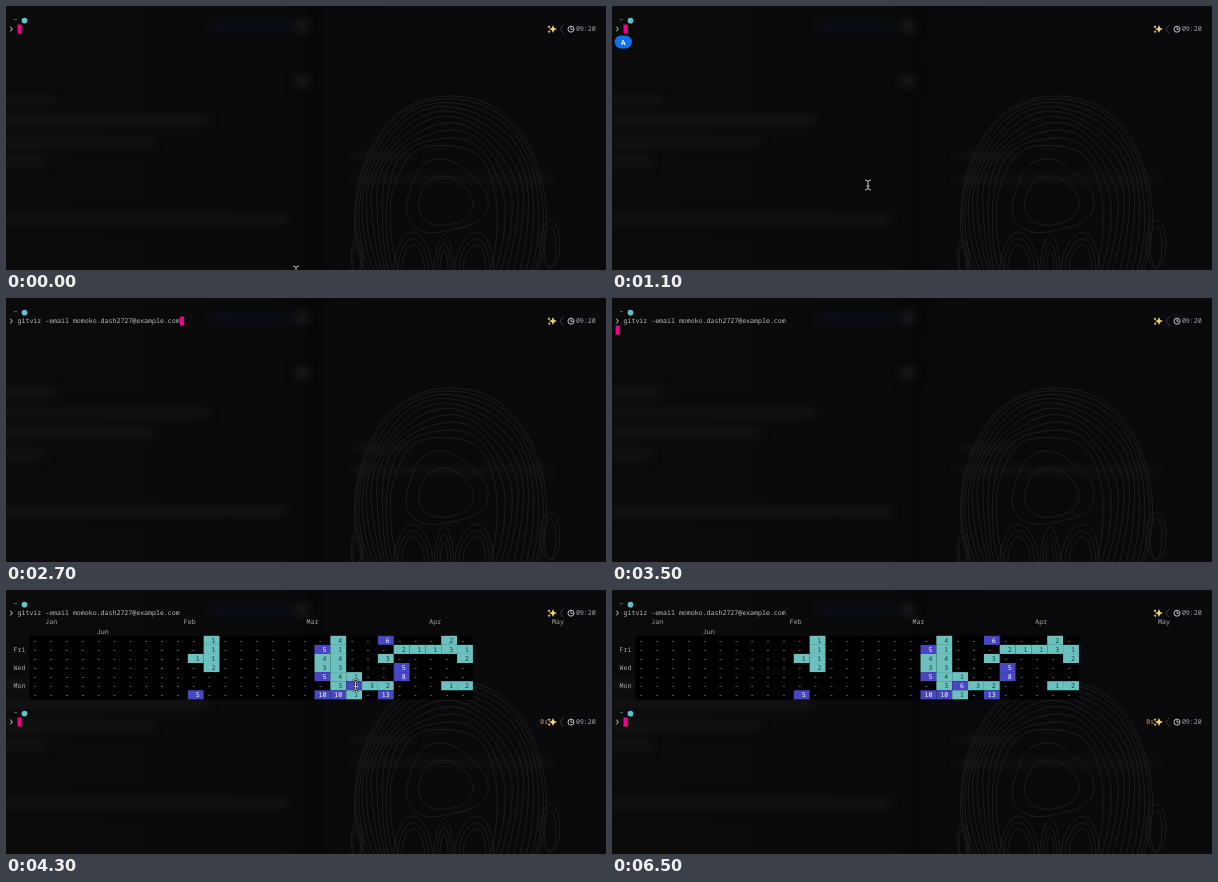
Write an HTML page that moves like this. It is 600x264 px and loops after 6600 ms.

```html
<!DOCTYPE html>
<html lang="en">
<head>
<meta charset="utf-8">
<title>Terminal commit graph</title>
<style>
  html, body { margin: 0; width: 100%; height: 100%; overflow: hidden; background: #0a0a0b; }
  svg { display: block; width: 600px; height: 264px; }
  text {
    font: 6.6px "Noto Sans Mono", "DejaVu Sans Mono", monospace;
    white-space: pre;
    text-rendering: geometricPrecision;
  }
  .line { fill: none; stroke-width: 1; }
</style>
</head>
<body>
<svg id="stage" viewBox="0 0 600 264">
  <defs>
    <filter id="soft" filterUnits="userSpaceOnUse" x="-20" y="-20" width="640" height="304"
      color-interpolation-filters="sRGB"><feGaussianBlur stdDeviation="4"/></filter>
    <linearGradient id="desk">
      <stop offset="0" stop-color="#0b0b0b"/>
      <stop offset=".46" stop-color="#0a0a0a"/>
      <stop offset=".51" stop-color="#070708"/>
      <stop offset=".54" stop-color="#09090b"/>
      <stop offset="1" stop-color="#0a0a0c"/>
    </linearGradient>
  </defs>
  <rect width="600" height="264" fill="url(#desk)"/>
  <g id="blur" filter="url(#soft)"></g>
  <g id="face" class="line" stroke="#222224" style="stroke-width:.8"></g>
  <g id="term"></g>
</svg>
<script>
const LOOP = 6600, STEP = 100;
const CW = 3.96, RH = 9.08, LEFT = 3.6;
const COMMAND = 'gitviz -email momoko.dash2727@example.com';
const $ = id => document.getElementById(id);
const colX = c => LEFT + c * CW;
const rowY = r => 14 + r * RH;
const lerp = (a, b, k) => a + (b - a) * k;
const clamp = v => Math.max(0, Math.min(1, v));

function add(parent, tag, attrs, content) {
  const el = document.createElementNS('http://www.w3.org/2000/svg', tag);
  for (const key in attrs) el.setAttribute(key, attrs[key]);
  if (content !== undefined) el.textContent = content;
  parent.appendChild(el);
  return el;
}
const group = parent => add(parent, 'g', {});
const line = (parent, d, stroke) => add(parent, 'path', { d, stroke, class: 'line' });
const label = (parent, col, row, str, fill, weight = 400) =>
  add(parent, 'text', { x: colX(col), y: rowY(row) + 2.3, fill, 'font-weight': weight }, str);
const show = (el, on) => el.setAttribute('visibility', on ? 'visible' : 'hidden');

// Blurred lines of the windows behind the terminal
const smear = (x, y, width, height = 8, fill = '#151515') =>
  add($('blur'), 'rect', { x, y: y - height / 2, width, height, fill });
[50, 203, 148, 40].forEach((end, i) => smear(-20, 94 + i * 20.5, end + 20));
smear(-20, 213, 300);
smear(205, 20, 80, 12, '#0b0e17');
[20, 75].forEach(y => smear(290, y, 12, 12, '#1b1b1d'));
[150, 173].forEach((y, i) => smear(345, y, 60 + i * 140, 8, '#121212'));

// Contour lines of the head: ellipses with a slow wobble
function contour(cx, cy, rx, up, down, wobble, lobes = 3) {
  let d = '';
  for (let i = 0; i <= 90; i++) {
    const a = i * Math.PI / 45, r = 1 + wobble * Math.cos(lobes * a + cx);
    const y = Math.sin(a);
    d += `${i ? 'L' : 'M'}${(cx + rx * r * Math.cos(a)).toFixed(1)} ${(cy + r * y * (y < 0 ? up : down)).toFixed(1)}`;
  }
  line($('face'), d).removeAttribute('class');
}
for (let i = 0; i < 10; i++) {
  const k = (i / 9) ** 1.3;
  contour(lerp(444.5, 438, k), lerp(208, 196, k), lerp(96, 53, k), lerp(119, 58, k), 130, .008 + .02 * k, 5);
}
contour(439, 196, 27, 25, 24, .05);
contour(439, 192, 40, 36, 36, .1);
for (let i = 0; i < 3; i++) {
  for (const side of [-1, 1]) {
    contour(438 + side * 31, 258, 19 - i * 4, 30 - i * 6, 30, .06);
  }
  contour(438, 264, 10 - i * 3, 34 - i * 8, 20, .04);
}
for (let i = 0; i < 2; i++) {
  contour(544, 236, 10 - i * 4, 21 - i * 6, 26, .03);
  contour(351, 250, 6 - i * 2, 16 - i * 5, 18, .03);
}

const term = $('term');

function prompt(row, took) {
  const g = group(term), y = rowY(row), y2 = rowY(row + 1);
  label(g, 1, row, '~', '#7fb8b4');
  add(g, 'circle', { cx: 18.5, cy: y + .6, r: 2.9, fill: '#5fc3cc' });
  line(g, `M4.3 ${y2 - 2.4}l2 2.4l-2 2.4`, '#c9d3c4');
  if (took) label(g, 134, row + 1, took, '#c79c62');
  const star = (x, cy, r) => {
    const q = r * .3, s = r - q;
    add(g, 'path', { fill: '#f3d27a',
      d: `M${x} ${cy - r}l${q} ${s}l${s} ${q}l${-s} ${q}l${-q} ${s}l${-q} ${-s}l${-s} ${-q}l${s} ${-q}z` });
  };
  star(547, y2, 4);
  star(543, y2 - 2.2, 1.7);
  star(543.2, y2 + 2.6, 1.7);
  line(g, `M557.5 ${y2 - 4.5}l-3.5 4.5l3.5 4.5`, '#3b3b40');
  line(g, `M565 ${y2 - 1.7}v2h1.7`, '#c2c7d0');
  add(g, 'circle', { cx: 565, cy: y2 + .1, r: 3, class: 'line', stroke: '#c2c7d0' });
  label(g, 143, row + 1, '09:20', '#a6aab6');
  return g;
}

prompt(0);
const ghost = label(term, 2, 1, '', '#525252');
const typed = label(term, 2, 1, '', '#bebebe');

// Commits per weekday, one base 36 digit per week; the weeks before are empty
const COMMITS = `
-1-------4--6---2-
-1------51---21131
11------44--3----2
-2------33---5----
--------541--8----
---------3632---12
5-------aa1-d-----`.trim().split('\n');
const WEEKS = 28, CELL = 4 * CW, GREY = '#a9a9a9';
const graph = group(term);
label(graph, 9, 2, 'Jan', GREY);
['Feb', 'Mar', 'Apr', 'May'].forEach((name, i) => label(graph, 44 + i * 31, 2, name, GREY));
label(graph, 22, 3, 'Jun', GREY);
add(graph, 'rect', { x: colX(5), y: rowY(3.5), width: WEEKS * CELL, height: 7 * RH, fill: '#000' });
COMMITS.forEach((days, r) => {
  const row = r + 4;
  if (r % 2) label(graph, 1, row, ['Fri', 'Wed', 'Mon'][r >> 1], GREY);
  [...days.padStart(WEEKS, '-')].forEach((digit, k) => {
    const col = 5 + k * 4, n = parseInt(digit, 36), hot = n >= 5;
    if (!n) return label(graph, col + 1, row, '-', GREY);
    add(graph, 'rect', { x: colX(col), y: rowY(row - .5), width: CELL, height: RH, fill: hot ? '#4747c2' : '#6cc0bd' });
    label(graph, col + (n > 9 ? 1 : 2), row, n, hot ? '#fff' : '#16403f', hot ? 700 : 400);
  });
});

const second = prompt(12, '0s');
const caret = add(term, 'rect', { width: 4.2, height: RH, fill: '#f5008c' });
const under = label(term, 0, 1, '', '#4d0030');

const badge = group(term);
add(badge, 'rect', { x: 2.5, y: 29.5, width: 17.5, height: 13, rx: 6.5, fill: '#1170ee' });
add(badge, 'text', { x: 11.2, y: 38.5, fill: '#fff', 'text-anchor': 'middle',
  style: 'font:700 6.6px Inter,sans-serif' }, 'A');

const mouse = group(term);
const BEAM = 'M-3 -5Q0 -5 0 -3Q0 -5 3 -5M0 -3.5V3.5M-3 5Q0 5 0 3Q0 5 3 5M-1.5 1H1.5';
line(mouse, BEAM, '#000').style.strokeWidth = 2;
line(mouse, BEAM, '#c4c4c4');

const TYPE = 1700, ACCEPT = 2600, ENTER = 3500, OUTPUT = 3600, READY = 3700, LEAVE = 5500;

function typedLength(t) {
  if (t < TYPE) return 0;
  return t < ACCEPT ? Math.min(3, 1 + Math.floor((t - TYPE) / STEP)) : COMMAND.length;
}
function caretCell(t) {
  if (t < ENTER) return [2 + typedLength(t), 1];
  if (t < OUTPUT) return [0, 2];
  return t < READY ? [0, 11] : [2, 13];
}

function render(t) {
  const length = typedLength(t), [col, row] = caretCell(t);
  typed.textContent = COMMAND.slice(0, length);
  ghost.textContent = length ? ' '.repeat(length) + COMMAND.slice(length) : '';
  caret.setAttribute('x', colX(col));
  caret.setAttribute('y', rowY(row - .5));
  under.setAttribute('x', colX(col));
  under.textContent = length ? COMMAND.charAt(length) : '';

  show(graph, t >= OUTPUT);
  show(second, t >= READY);
  badge.setAttribute('opacity', Math.min(clamp((t - 800) / 300), clamp((1900 - t) / 200)));

  // The pointer hides while typing and rests on the graph later
  const k = 1 - (1 - clamp(t / 700)) ** 2, settle = clamp((t - 800) / 300);
  const [x, y] = t < TYPE
    ? [lerp(290, 257, k) - settle, lerp(265, 177, k) + settle * 2]
    : [349.5, 95.5];
  show(mouse, t < TYPE || (t >= READY && t < LEAVE));
  mouse.setAttribute('transform', `translate(${x} ${y})`);
}

const start = performance.now();
function tick() {
  const t = (performance.now() - start) % LOOP;
  render(Math.floor(t / STEP) * STEP);
  requestAnimationFrame(tick);
}
tick();
</script>
</body>
</html>
```
